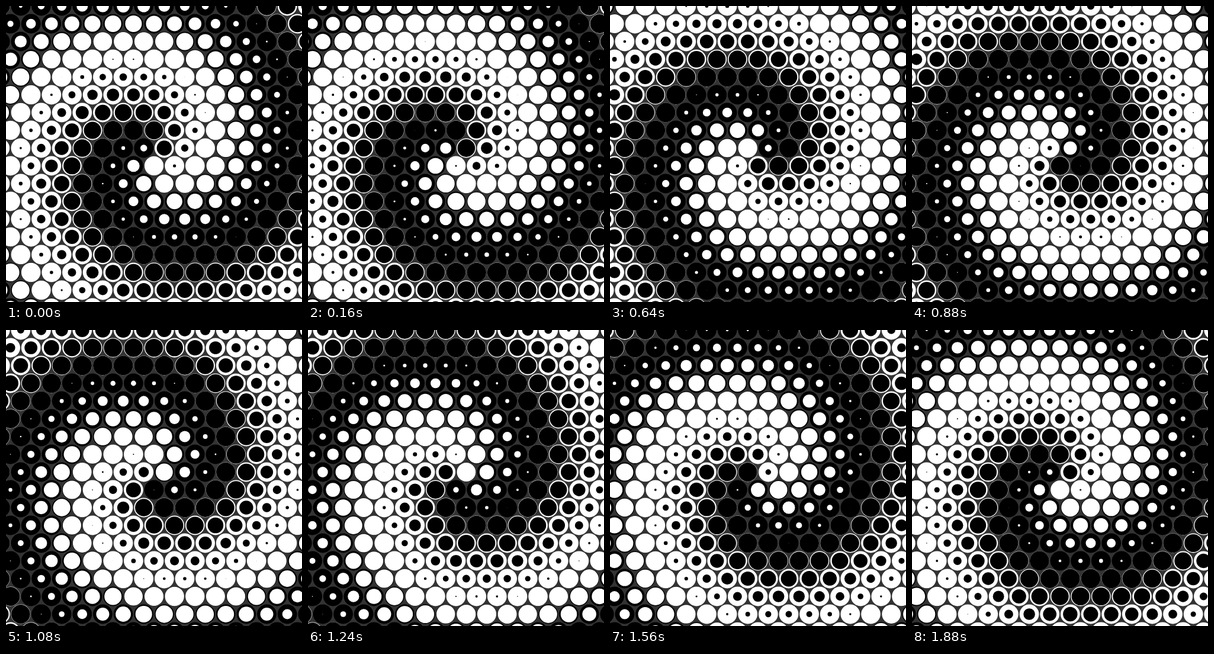
Recreate the animation shown at these times as an HTML page with a canvas. Size 500 by 500 pixels, loop 1920 ms.

```html
<!DOCTYPE html>
<html lang="en">
<head>
<meta charset="utf-8">
<title>Spiral of dots</title>
<style>
html, body { margin: 0; width: 100%; height: 100%; overflow: hidden; background: #333; }
canvas { display: block; width: 500px; height: 500px; }
</style>
</head>
<body>
<canvas id="stage" width="500" height="500"></canvas>
<script>
const ctx = document.getElementById('stage').getContext('2d');
const LOOP = 1920, STEP = 40;
const SIZE = 500, MID = SIZE / 2;
const ROW = 30, COL = 20 * Math.sqrt(3), RADIUS = 16.4;
const TURN = 2 * Math.PI;
const TWIST = 0.02;   // radians of phase per pixel from the centre
const OFFSET = 0.761; // cycle position at the centre, pointing right

// Hexagonal grid whose triangle centroid sits on the stage centre
const cells = [];
for (let row = 0; row <= 17; row++) {
  const shift = row % 2 ? 0 : COL / 2;
  for (let col = -8; col <= 8; col++) {
    const x = MID + shift + col * COL, y = row * ROW;
    const dx = x - MID, dy = y - MID;
    const phase = OFFSET - (Math.atan2(dy, dx) + TWIST * Math.hypot(dx, dy)) / TURN;
    cells.push({ x, y, phase });
  }
}

const ease = u => Math.sin(u * Math.PI / 2);

function disc(x, y, r, color) {
  ctx.fillStyle = color;
  ctx.beginPath();
  ctx.arc(x, y, r, 0, TURN);
  ctx.fill();
}

function draw(time) {
  ctx.fillStyle = '#333';
  ctx.fillRect(0, 0, SIZE, SIZE);
  for (const { x, y, phase } of cells) {
    const p = phase + time / LOOP;
    const cycle = 2 * (p - Math.floor(p));
    const [base, dot] = cycle < 1 ? ['#000', '#fff'] : ['#fff', '#000'];
    disc(x, y, RADIUS, base);
    disc(x, y, RADIUS * ease(cycle % 1), dot);
  }
}

const start = performance.now();
function tick() {
  const time = (performance.now() - start) % LOOP;
  draw(Math.floor(time / STEP) * STEP);
  requestAnimationFrame(tick);
}
tick();
</script>
</body>
</html>
```
